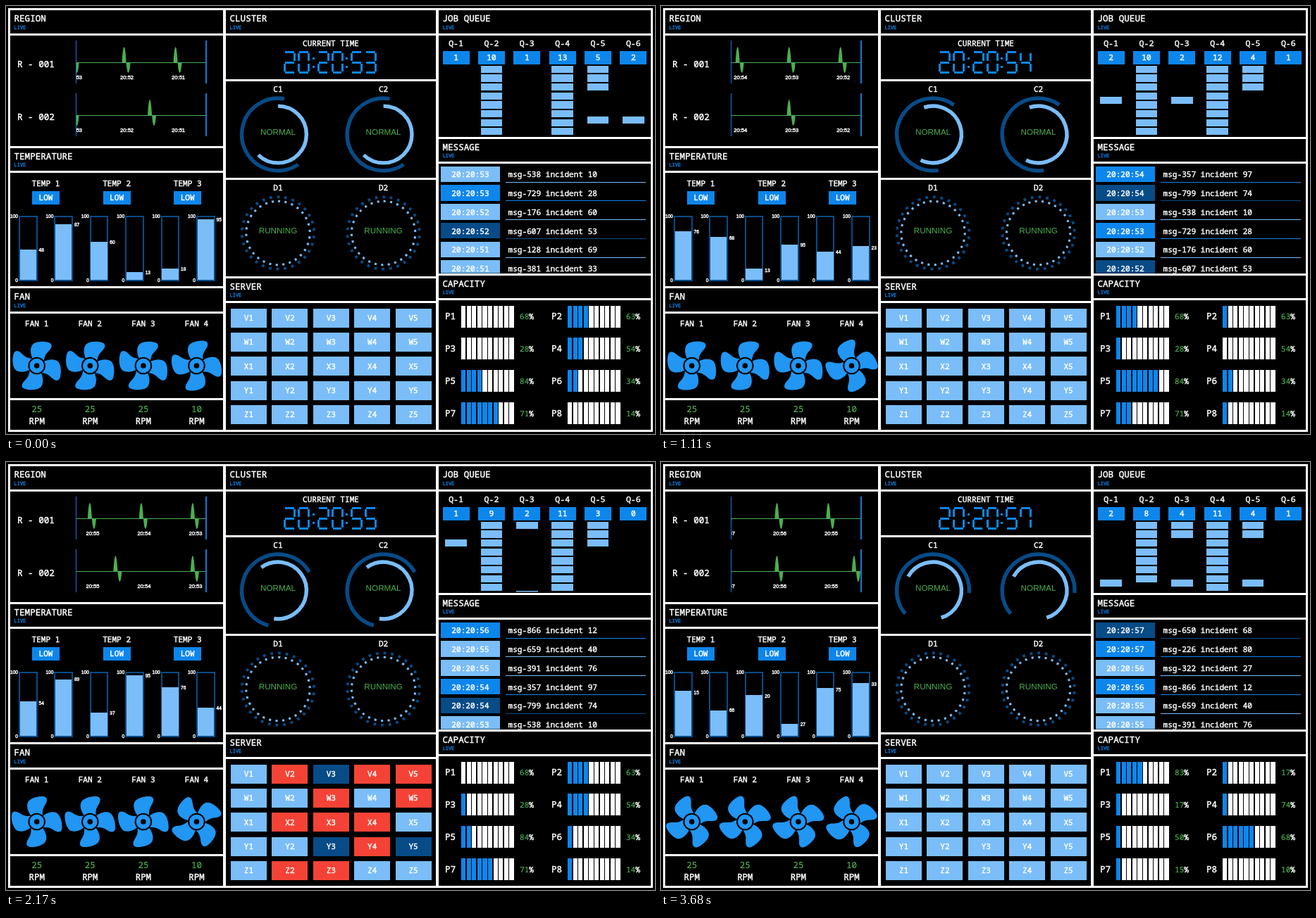
Write an HTML page with a canvas that moves like this. It is 921 by 608 pixels and loops after 3710 ms.

```html
<!DOCTYPE html>
<html lang="en">
<head>
<meta charset="utf-8">
<title>Operations board</title>
<style>
  html, body { margin: 0; width: 100%; height: 100%; overflow: hidden; background: #000; }
  canvas { display: block; width: 921px; height: 608px; }
</style>
</head>
<body>
<canvas id="board" width="921" height="608"></canvas>
<script>
const LOOP = 3710;
const BEAT = 468, FIRST_BEAT = 251;   // two beats make one second of the clock
const MID = '#0d86ec', LIGHT = '#7abdf8', DARK = '#074b87';
const GREEN = '#4caf50', RED = '#f44336', FAN = '#2196f3', WHITE = '#fff';
const TINTS = { L: LIGHT, M: MID, D: DARK, R: RED };
const MONO = '"Noto Sans Mono", "DejaVu Sans Mono", monospace';
const SANS = '"Liberation Sans", Arial, sans-serif';
const ctx = document.getElementById('board').getContext('2d');

// ---------- helpers ----------
const beatTime = n => FIRST_BEAT + BEAT * n;
const beatAt = t => Math.floor((t - FIRST_BEAT) / BEAT);
const secondAt = t => Math.floor((beatAt(t) + 1) / 2);
const rad = deg => deg * Math.PI / 180;

// edges snap to whole pixels
function rect(x, y, w, h, color) {
  const left = Math.round(x), top = Math.round(y);
  ctx.fillStyle = color;
  ctx.fillRect(left, top, Math.round(x + w) - left, Math.round(y + h) - top);
}

// y is the middle of the capitals, weight thickens the strokes
function text(str, x, y, { size = 11.1, color = WHITE, align = 'center', font = MONO, weight = 0.45 } = {}) {
  ctx.font = `${size}px ${font}`;
  ctx.textAlign = align;
  ctx.fillStyle = ctx.strokeStyle = color;
  const base = y + size * 0.357;
  ctx.fillText(str, x, base);
  if (weight) {
    ctx.lineWidth = weight;
    ctx.strokeText(str, x, base);
  }
}

function disc(x, y, r, color) {
  ctx.fillStyle = color;
  ctx.beginPath();
  ctx.arc(x, y, r, 0, 7);
  ctx.fill();
}

function clipped(x, y, w, h, paint) {
  ctx.save();
  ctx.beginPath();
  ctx.rect(x, y, w, h);
  ctx.clip();
  paint();
  ctx.restore();
}

// ---------- frame of the board ----------
// names are headers, numbers are body heights, the last body fills the rest
const COLUMNS = [
  [6, 302, ['REGION', 157, 'TEMPERATURE', 161, 'FAN', 120, 42.5]],
  [312, 298, ['CLUSTER', 62, 137, 137, 'SERVER', 180]],
  [614, 301, ['JOB QUEUE', 144, 'MESSAGE', 155.5, 'CAPACITY', 184]]
];

function drawFrame() {
  rect(0, 0, 921, 608, '#000');
  rect(3, 3, 915, 602, WHITE);
  for (const [x, w, parts] of COLUMNS) {
    let y = 6;
    for (const part of parts) {
      const header = typeof part === 'string', h = header ? 32.5 : part;
      rect(x, y, w, h, '#000');
      if (header) {
        text(part, x + 5.5, y + 12, { size: 12.6, align: 'left' });
        text('LIVE', x + 5.5, y + 24.5, { size: 7, align: 'left', color: MID, weight: 0.3 });
      }
      y += h + 3;
    }
  }
}

// ---------- region ----------
function pulse(x, y) {
  ctx.fillStyle = GREEN;
  ctx.beginPath();
  ctx.moveTo(x - 6, y);
  ctx.bezierCurveTo(x - 4.5, y - 29, x - 1.5, y - 29, x, y);
  ctx.bezierCurveTo(x + 1.5, y + 20, x + 4.5, y + 20, x + 6, y);
  ctx.fill();
}

function drawRegion(t) {
  const at = s => 171.5 + t * 0.0785 + 73 * s;
  [80, 155].forEach((y, i) => {
    const gap = 1 + i / 2;
    text(`R - 00${i + 1}`, 16, y + 3, { size: 12.6, align: 'left' });
    clipped(99, y - 31, 185, 62, () => {
      rect(99, y, 185, 1, GREEN);
      for (let s = 2; s > -6; s -= gap) pulse(at(s) - 1, y);
      for (let s = 1; s > -6; s--) text(`20:${52 - s}`, at(s), y + 21, { size: 7.6, font: SANS });
    });
    for (const x of [98.5, 283]) rect(x, y - 31, 1.5, 61, '#1479d4');
  });
}

// ---------- temperature ----------
// one row of readings per second
const READINGS = [
  [48, 87, 60, 13, 18, 95],
  [76, 68, 13, 95, 44, 23],
  [54, 89, 37, 95, 76, 44],
  [87, 24, 81, 3, 76, 100],
  [15, 66, 20, 27, 75, 33]
];

function drawTemperature(t) {
  for (let i = 0; i < 3; i++) {
    const x = 56.5 + 100.6 * i;
    text(`TEMP ${i + 1}`, x, 252);
    rect(x - 19.5, 263, 39, 19, MID);
    text('LOW', x, 272.5);
  }
  const k = secondAt(t), reach = (t - beatTime(2 * k - 1)) * 0.1077;
  READINGS[k].forEach((goal, i) => {
    const from = (READINGS[k - 1] || READINGS[k])[i];
    const level = goal > from ? Math.min(goal, from + reach) : Math.max(goal, from - reach);
    const x = 18 + 50.4 * i, top = 389.5 - 0.91 * level;
    const note = { size: 6.6, font: SANS, align: 'right' };
    rect(x, 298, 26.5, 92.5, DARK);
    rect(x + 2, 300, 22.5, 89, '#000');
    rect(x + 1.5, top, 23.5, 389.3 - top, LIGHT);
    text('100', x - 1, 299, note);
    text('0', x - 1, 390, note);
    text(goal, x + 28.5, top + (goal < from ? 2 : 0.5), { ...note, align: 'left' });
  });
}

// ---------- fans ----------
const BLADE = new Path2D('M-5-8C-10-17-10-27-5-31C0-35 12-35 18-32.5C23-30 21-25 17-21C13-17 11-14 10-7Z');

function drawFans(t) {
  for (let i = 0; i < 4; i++) {
    const x = 43.7 + 75.6 * i, y = 511, rpm = i < 3 ? 25 : 10;
    text(`FAN ${i + 1}`, x, 451.5);
    ctx.save();
    ctx.translate(x, y);
    ctx.rotate(rad(t * rpm * 0.0064 - (i < 3 ? 0 : 10)));
    ctx.fillStyle = FAN;
    for (let b = 0; b < 4; b++) {
      ctx.fill(BLADE);
      ctx.rotate(Math.PI / 2);
    }
    ctx.restore();
    disc(x, y, 12.3, '#000');
    disc(x, y, 10.3, FAN);
    disc(x, y, 3.8, '#000');
    text(rpm, x, 573, { size: 12.4, color: GREEN, weight: 0.2 });
    text('RPM', x, 589.5, { size: 12.4 });
  }
}

// ---------- cluster ----------
const DIGITS = { 0: 'abcdef', 2: 'abged', 3: 'abgcd', 4: 'fgbc', 5: 'afgcd', 6: 'afgcde', 7: 'abcf' };

// bars a, g, d from top to bottom; posts f, b above e, c
function segment(name, x, y) {
  const bar = 'agd'.indexOf(name), post = 'fbec'.indexOf(name);
  if (bar >= 0) rect(x + 2, y + 14.5 * bar, 12.5, 3, MID);
  else rect(x + 14 * (post % 2), y + 3 + 15 * (post >> 1), 3, 11, MID);
}

function drawClock(t) {
  text('CURRENT TIME', 461, 53.5);
  [...`2020${53 + secondAt(t)}`].forEach((d, i) => {
    for (const name of DIGITS[d]) segment(name, 394 + 47.6 * (i >> 1) + 20 * (i % 2), 64);
  });
  for (const x of [434.7, 482.3]) for (const y of [72.5, 84.5]) rect(x, y, 3, 3, MID);
}

function arc(x, y, r, from, to, width, color, dash = []) {
  ctx.strokeStyle = color;
  ctx.lineWidth = width;
  ctx.setLineDash(dash);
  ctx.beginPath();
  ctx.arc(x, y, r, rad(from - 90), rad(to - 90));
  ctx.stroke();
  ctx.setLineDash([]);
}

function dots(x, y, r, turn, size, color) {
  const pitch = 2 * Math.PI * r / 30;
  arc(x, y, r, turn, turn + 359.99, size, color, [size, pitch - size]);
}

function drawCluster(t) {
  drawClock(t);
  const outer = 10 + t * 0.0228, inner = -t * 0.0165;
  const status = { size: 11.7, color: GREEN, font: SANS, weight: 0 };
  [386, 535.6].forEach((x, i) => {
    text(`C${i + 1}`, x, 118.5);
    arc(x, 182.5, 51.4, outer - 224, outer, 5.4, DARK);
    arc(x, 182.5, 40.4, inner, inner + 224, 5.4, LIGHT);
    text('NORMAL', x, 179, status);
    text(`D${i + 1}`, x, 258.5);
    dots(x, 322.5, 51.2, outer, 3.8, DARK);
    dots(x, 322.5, 45.2, inner, 3.1, LIGHT);
    text('RUNNING', x, 318.5, status);
  });
}

// ---------- server ----------
const CALM = 'L'.repeat(25);
const FAULTS = 'LRDRR LLRLR LRRRL LLDRD LRRLL'.replaceAll(' ', '');
const OUTAGE = 'LLDDD DDRDD LDDRD DLLLL RRLDD'.replaceAll(' ', '');
const ALERTS = [CALM.slice(3) + 'RLL', FAULTS, FAULTS, OUTAGE];

// alerts blink during the second half of each second
function drawServers(t) {
  const since = t - FIRST_BEAT, k = Math.floor(since / (2 * BEAT));
  const lit = since >= 0 && since % (2 * BEAT) < 520;
  [...(lit ? ALERTS[k] : CALM)].forEach((s, i) => {
    const col = i % 5, row = Math.floor(i / 5);
    const x = 319 + 58.4 * col, y = 429.5 + 34.35 * row;
    rect(x, y, 51, 27, TINTS[s]);
    text('VWXYZ'[row] + (col + 1), x + 25.5, y + 13.5);
  });
}

// ---------- job queue ----------
// jobs at the start, beats with an arrival, seconds with a removal
const QUEUES = [[0, '248', '23'], [9, '', '34'], [0, '23568', '23'], [12, '5', '123'], [3, '038', '123'], [0, '0', '1']];
const ARRIVAL_LAG = 35;

function drawQueues(t) {
  const incoming = Math.abs(beatAt(t - ARRIVAL_LAG) % 2);
  QUEUES.forEach(([ready, arrivals, removals], i) => {
    const x = 638.6 + 50.35 * i;
    const entered = [...arrivals].map(n => beatTime(n - 1) + ARRIVAL_LAG).filter(v => v <= t);
    const starts = [...Array(ready).fill(-2000), ...entered];
    const gone = [...removals].map(n => beatTime(2 * n - 1)).filter(v => v <= t);
    const moved = gone.reduce((sum, v) => sum + Math.min(1, (t - v) / 80), 0);
    text(`Q-${i + 1}`, x, 53, { size: 11.6 });
    rect(x - 19, 63.5, 38, 19, MID);
    text(starts.length - gone.length + incoming, x, 73);
    clipped(x - 20, 84, 40, 100.5, () => starts.forEach((start, n) => {
      if (n < gone.length) return;
      const y = Math.max(84.6 + 12.65 * (n - moved), 185.5 - (t - start) * 0.158);
      if (n - gone.length < 8) rect(x - 15.3, y, 30.6, 10.3, LIGHT);
    }));
  });
}

// ---------- messages ----------
// oldest first: tint, id, incident; one per beat
const MESSAGES = `L 381 33,L 128 69,D 607 53,L 176 60,M 729 28,L 538 10,D 799 74,
M 357 97,L 391 76,L 659 40,M 866 12,L 322 27,M 226 80,D 650 68`.split(',').map(m => m.trim().split(' '));

function drawMessages(t) {
  const newest = 6 + beatAt(t);
  clipped(614, 224, 301, 155.5, () => {
    for (let row = 0; row < 6; row++) {
      const n = newest - row, [tint, id, incident] = MESSAGES[n];
      const y = 227.7 + 26.75 * row;
      rect(617, y, 84, 22.4, TINTS[tint]);
      text(`20:20:${51 + (n >> 1)}`, 659, y + 11.7);
      text(`msg-${id} incident ${incident}`, 712.5, y + 11.7, { align: 'left' });
      rect(709, y + 22, 198.5, 1, TINTS[tint]);
    }
  });
}

// ---------- capacity ----------
const LOADS = [[68, 63, 28, 54, 84, 34, 71, 14], [83, 17, 17, 74, 50, 68, 15, 10]];
const START_CELLS = '04034270';
const CELL_STEP = BEAT * 2 / 3;
const loadsAt = t => LOADS[secondAt(t) < 3 ? 0 : 1];

// cells fill one by one up to the load, then start over
function litCells(i, t) {
  let lit = +START_CELLS[i];
  const first = beatTime(1) - 2 * CELL_STEP + (i % 4 === 3 ? 115 : 0);
  for (let at = first; at <= t; at += CELL_STEP) {
    lit = lit < Math.floor(loadsAt(at)[i] / 10) ? lit + 1 : 0;
  }
  return lit;
}

function drawCapacity(t) {
  loadsAt(t).forEach((load, i) => {
    const x = 623 + 151 * (i % 2), y = 425.5 + 45.9 * (i >> 1), lit = litCells(i, t);
    text(`P${i + 1}`, x, y + 15.5, { size: 12.6, align: 'left' });
    for (let c = 0; c < 10; c++) rect(x + 23 + 7.6 * c, y, 6.2, 31, c < lit ? MID : WHITE);
    text(load, x + 106, y + 15.5, { align: 'left', color: GREEN, weight: 0.2 });
    text('%', x + 119.3, y + 15.5, { align: 'left' });
  });
}

// ---------- loop ----------
const PARTS = [drawFrame, drawRegion, drawTemperature, drawFans, drawCluster,
  drawServers, drawQueues, drawMessages, drawCapacity];

function render() {
  const t = performance.now() % LOOP;
  for (const part of PARTS) part(t);
  requestAnimationFrame(render);
}
render();
</script>
</body>
</html>
```
